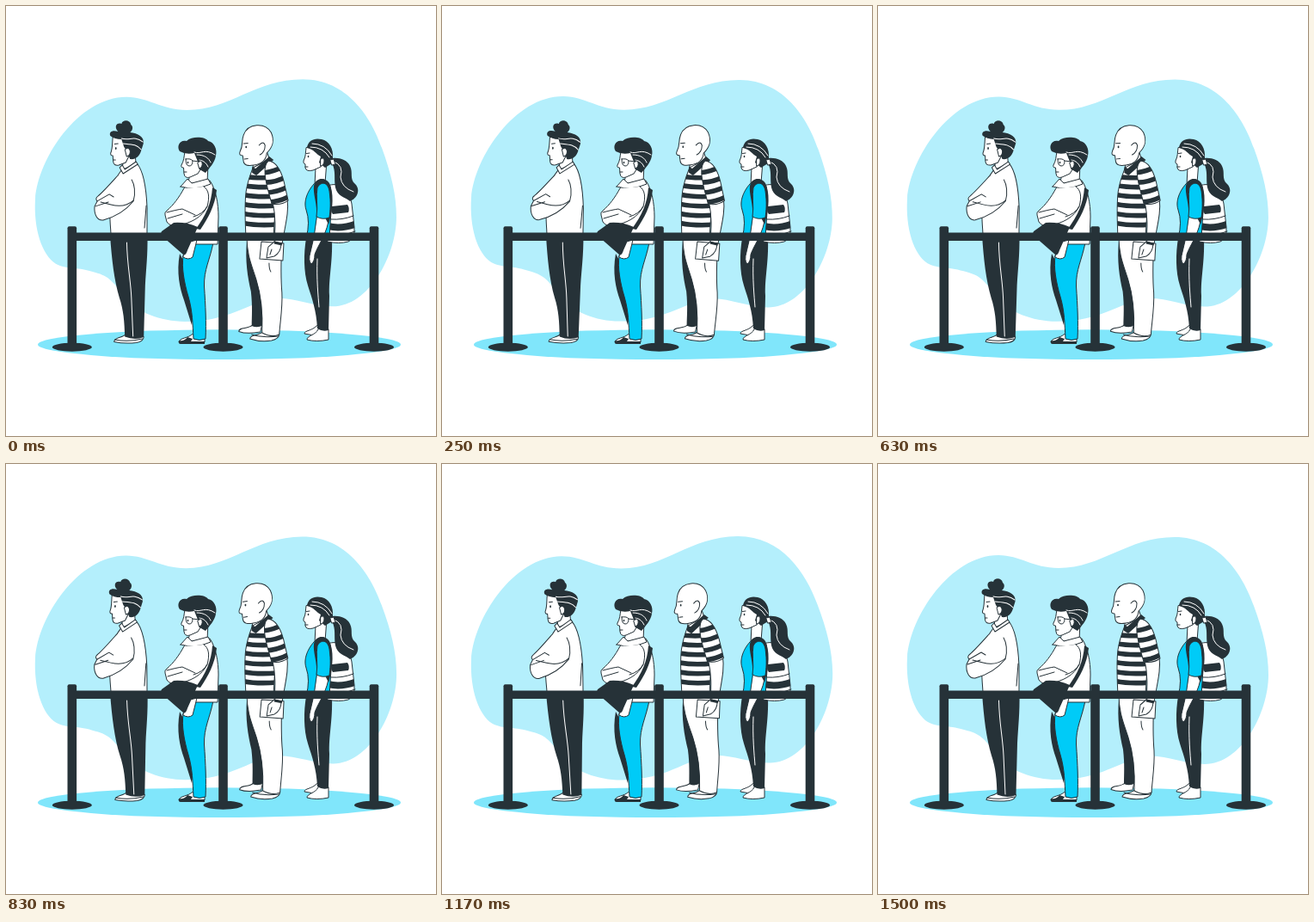
An HTML page that plays this animation: 500x500 px, repeating every 1540 ms.

```html
<!DOCTYPE html>
<html lang="en">
<head>
<meta charset="utf-8">
<title>Waiting line</title>
<style>
html, body { margin: 0; width: 100%; height: 100%; overflow: hidden; background: #fff; }
svg { display: block; width: 100vw; height: 100vh; }
path { stroke-linecap: round; stroke-linejoin: round; }
.w { fill: #fff; stroke: #263238; }
.k { fill: #263238; }
.c { fill: #00cbf7; stroke: #263238; }
.l { fill: none; stroke: #fff; }
.d { fill: none; stroke: #263238; }
.band { fill: none; stroke: #263238; stroke-width: 5.6; stroke-linecap: butt; }
</style>
</head>
<body>
<svg viewBox="0 0 500 500">
<defs>
  <clipPath id="shirt"><path id="shirtShape" d="M287 188L306 178C315 190 317 215 313 235L311 270H279C278 247 277 232 279 216C281 203 284 196 287 188Z"/></clipPath>
  <clipPath id="sleeve"><path id="sleeveShape" d="M305 180C313 181 319 189 323 204L328 226Q320 232 309 230C306 219 302 207 301 196Q300 184 305 180Z"/></clipPath>
  <clipPath id="pack"><path id="packShape" d="M374 209C387 204 399 212 402 230L405 257Q406 271 398 274Q387 277 374 274Z"/></clipPath>
  <g id="post">
    <ellipse class="k" cy="396.700" rx="23" ry="5"/>
    <rect class="k" x="-5.3" y="256.300" width="10.6" height="140" rx="2"/>
  </g>
</defs>

<path id="blob" fill="#b4effc" d="M34 225C37 178 84 106 140 106C165 106 180 121 210 121C260 121 290 85 345 85C396 85 424 128 437 165C448 195 454 220 454 245C454 290 422 349 380 349C356 349 330 337 312 340C280 345 260 367 208 367C180 367 152 356 140 340C122 318 120 314 100 309C80 303 72 307 58 300C42 290 32 260 34 225Z"/>
<ellipse cx="248" cy="393.7" rx="211" ry="17.4" fill="#80e6fb"/>

<!-- man with crossed arms -->
<g id="first">
  <path class="w" d="M139 382C136 386 126 385 126 390.5Q138 393 152 391.5Q160 390 160.500 385L158 381Z"/>
  <path class="d" d="M127 388Q142 391 159 387"/>
  <path class="k" d="M121 266H164.500C165 290 163 305 162 325L160.500 385Q150 389 138.500 384.500C138 367 137 354 132 339C126 319 123 295 121 266Z"/>
  <path class="l" d="M140.500 275C141 302 145 317 146 339L148 384"/>
  <path class="w" d="M136 177L135 193L151 186L150 172Z"/>
  <path class="w" d="M124 152C123 160 124 165 121.500 171Q121 174 124 174L124.500 181Q125 186 131 185L139 182L146 168L140 152Z"/>
  <path class="k" d="M121 151C119 146 124 144 130 146C125 141 128 135 134 137C135 132 144 132 145 138C148 140 147 145 144 147C153 148 161 152 159.500 160L157 168C155 175 150 179 144 178L140 168L137 164L134 155Q126 155 121 151Z"/>
  <path class="l" d="M134 154C144 157 148 150 159 158M136 160C147 161 152 161 157 167"/>
  <path class="w" d="M138 167Q142 163 144 168Q145 174 140 175Z"/>
  <path class="d" d="M126 160.500L130 160M124.500 179L127 179"/>
  <ellipse class="k" cx="127.500" cy="165.500" rx=".9" ry="1.5"/>
  <path class="w" d="M134 191L152 183C159 191 163 212 164 235V265H122C121 247 119 239 122 219C125 206 128 198 134 191Z"/>
  <path class="w" d="M132 188L135 185L138 190L151 181L153 184L136 195Z"/>
  <path class="w" d="M129 198C120 208 112 217 107 221Q103 224 106 227L103 233C102 242 106 250 113 249C128 245 139 238 148 227C151 217 149 207 146 202"/>
  <path class="d" d="M148 226Q138 235 122 231L110 228M106 227L120 219L125 222M104 233L119 228M163 232L161 258"/>
</g>

<!-- man with glasses and a bag -->
<g>
  <path class="k" d="M202 288C198 310 202 328 207 342L216 371L222 325Z"/>
  <path class="w" d="M216 382C213 386 201 386 201 391Q216 394 231 391L231 383Z"/>
  <path class="k" d="M201 389Q208 390 211 385L217 387L215 390H231V393H203Q200 393 201 389Z"/>
  <path class="c" d="M206 291L215 275H241C237 296 230 306 230.500 326C232 349 233 368 232 387Q225 390 218 387C217 370 217 355 212 338C207 321 204 304 206 291Z"/>
  <path class="w" d="M214 192L212 207L234 205L235 184Z"/>
  <path class="w" d="M208 169C207 175 207 180 204 185Q203 188 206.500 188L207 195Q208 201 214 199L223 195L231 182L225 168Z"/>
  <path class="k" d="M202 169C198 163 202 155 210 157C216 151 232 152 235 157C242 158 246 167 244 174C243 182 236 189 232 194L225 190L223 181L219 171Q209 173 202 169Z"/>
  <path class="l" d="M219 170C227 173 231 165 243 173M222 173C231 173 236 177 238 182M225 179Q232 180 235 187"/>
  <path class="w" d="M223 182Q227 178 228 182Q229 187 225 189Z"/>
  <path class="d" d="M209 178Q215 177 217 180Q217 186 213 186Q209 186 209 178ZM217 180L225 181M207 193L210 193"/>
  <ellipse class="k" cx="211.500" cy="182" rx=".8" ry="1.3"/>
  <path class="w" d="M209 207L237 203C244 213 247 230 247 245L246 277H208C205 260 202 243 204 228Z"/>
  <path class="w" d="M203 210L211 201L216 206L235 201L238 207Q220 215 203 210Z"/>
  <path class="w" d="M207 212C201 223 195 231 187 238Q184 240 185 243L187 251Q191 257 199 255C214 253 228 246 234 233C237 222 236 214 230 210"/>
  <path class="d" d="M187 240Q198 237 205 236L220 243M188 247L205 242M234 233Q229 242 218 245"/>
  <path class="k" d="M240 211L245 214C243 232 235 247 226 260L221 259C232 244 239 229 240 211Z"/>
  <path class="w" d="M211 275L222 272L217 292Q212 296 206 292Z"/>
  <path class="k" d="M195 252L181 262Q179 265 182 268L206 289Q209 291 211 284L223 257Q210 251 195 252Z"/>
</g>

<!-- man in a striped shirt -->
<g id="third">
  <path class="w" d="M287 371C282 376 271 373 271 378.500Q280 382 296 379L298 370Z"/>
  <path class="k" d="M280 274C278 296 281 315 285 332C287 350 286 361 286 372Q293 375 299 371L305 300Z"/>
  <path class="w" d="M299 378C296 384 284 381 284 387Q296 391 309 389Q318 387 318 381Z"/>
  <path class="w" d="M280 268H321C320 293 319 311 321 333C322 350 319 367 318 382Q309 386 298 380C299 357 297 337 291 318C286 302 280 290 280 268Z"/>
  <path class="d" d="M306 299Q306 306 308 309M286 382Q299 386 317 384"/>
  <path class="w" d="M287 174V192L307 181L302 166Z"/>
  <path class="w" d="M276 150C281 136 301 135 308 147C313 158 309 165 303 171Q302 183 288 185Q277 187 276 181L275 174Q270 174 272 169C276 162 273 158 276 150Z"/>
  <path class="w" d="M294 162Q299 156 301 162Q301 170 295 173"/>
  <path class="d" d="M276 160L281 159.500M277 178L281 177.500"/>
  <ellipse class="k" cx="279" cy="164" rx=".9" ry="1.3"/>
  <use href="#shirtShape" class="w"/>
  <path class="band" clip-path="url(#shirt)" d="M276 198Q291 201 316 199M274 208Q290 212 316 210M274 219Q290 223 316 221M274 230Q290 234 316 232M274 241Q290 245 316 243M274 252Q290 256 316 254"/>
  <path class="k" d="M286 187L290 189L306 175L311 179L291 197L286 194Z"/>
  <path class="w" d="M310 228L327 224C329 240 325 253 321 277L312 276C313 260 314 246 310 228Z"/>
  <use href="#sleeveShape" class="w"/>
  <path class="band" clip-path="url(#sleeve)" d="M296 194Q308 194 322 187M299 205Q312 206 327 198M302 217Q315 217 330 209M305 228Q318 228 332 220"/>
  <path class="w" d="M297 274L323 276L322 296L295 294Z"/>
  <path class="w" d="M312 274L320 276C320 284 317 288 312 291L303 293L305 280Z"/>
  <path class="d" d="M309 283L307 289"/>
  <path class="band" style="stroke-width:3" d="M312 275L321 277"/>
</g>

<!-- woman with a backpack -->
<g>
  <path class="w" d="M361 372C356 378 347 377 347 381Q355 384 365 381L370 373Z"/>
  <path class="w" d="M363 376C360 383 350 383 350 388Q361 391 375 388V376Z"/>
  <path class="k" d="M349 270H379C380 299 375 316 376 337L375 377Q368 379 362 375C361 354 356 341 351 325C346 309 346 288 349 270Z"/>
  <path class="l" d="M362 294C361 318 363 337 364 350"/>
  <use href="#packShape" class="w"/>
  <path class="band" style="stroke-width:8" clip-path="url(#pack)" d="M374 256Q390 260 408 253"/>
  <path class="k" d="M379 233L397 231Q400 235 398 240L380 242Q377 238 379 233Z"/>
  <path class="d" d="M378 248Q391 249 404 244M376 265Q391 268 406 262"/>
  <path class="w" d="M360 188L359 208L371 206L373 180Z"/>
  <path class="w" d="M349 165C348 171 349 174 346 180Q345 183 348 184L348 188Q349 193 357 191L366 187L372 178L360 162Z"/>
  <path class="k" d="M350 165C351 156 359 153 367 155C376 157 381 166 380 177C387 176 397 179 400 186C404 194 399 201 406 207C413 214 408 224 400 227C394 222 385 221 383 211C381 200 384 192 379 183L371 188L364 182L366 175C360 172 359 167 350 165Z"/>
  <path class="l" d="M356 160Q371 160 379 174M354 164Q369 164 376 176M381 181Q393 185 389 199Q390 211 404 216"/>
  <path class="w" d="M366 178Q370 175 370 180Q370 185 366 186Z"/>
  <path class="w" d="M377 179L381 178L383 184L379 185Z"/>
  <path class="d" d="M349.500 171.500L353 171M348 187L351 187"/>
  <ellipse class="k" cx="351.500" cy="175" rx=".8" ry="1.300"/>
  <path class="c" d="M361 204Q371 197 377 210L378 239L376 270H349Q354 251 349 237C345 225 353 211 361 204Z"/>
  <path class="w" d="M362 243L376 243C374 265 363 277 359 289Q359 297 355 300Q351 296 354 286L358 269Z"/>
  <path class="k" d="M358 209C361 199 371 199 376 206C381 216 381 235 375 254L370 244L361 238C361 228 357 218 358 209Z"/>
  <path class="c" d="M362 211C366 204 374 204 376 215C378 229 377 238 376 246Q368 249 361 245C363 232 360 221 362 211Z"/>
</g>

<rect class="k" x="77" y="263.500" width="351" height="9.500"/>
<use href="#post" x="76.800"/>
<use href="#post" x="252.500"/>
<use href="#post" x="428"/>
</svg>
<script>
const LOOP = 1540, PEAK = 345;
// id, swing in degrees, pivot
const swings = [
  ["blob", 0.65, 244, 226],
  ["first", 0.9, 143, 262],
  ["third", 0.8, 300, 264],
].map(([id, ...rest]) => [document.getElementById(id), ...rest]);

function draw(now) {
  const sway = Math.cos((now - PEAK) / LOOP * 2 * Math.PI);
  for (const [part, swing, x, y] of swings)
    part.setAttribute("transform", `rotate(${swing * sway} ${x} ${y})`);
  requestAnimationFrame(draw);
}
draw(performance.now());
</script>
</body>
</html>
```
